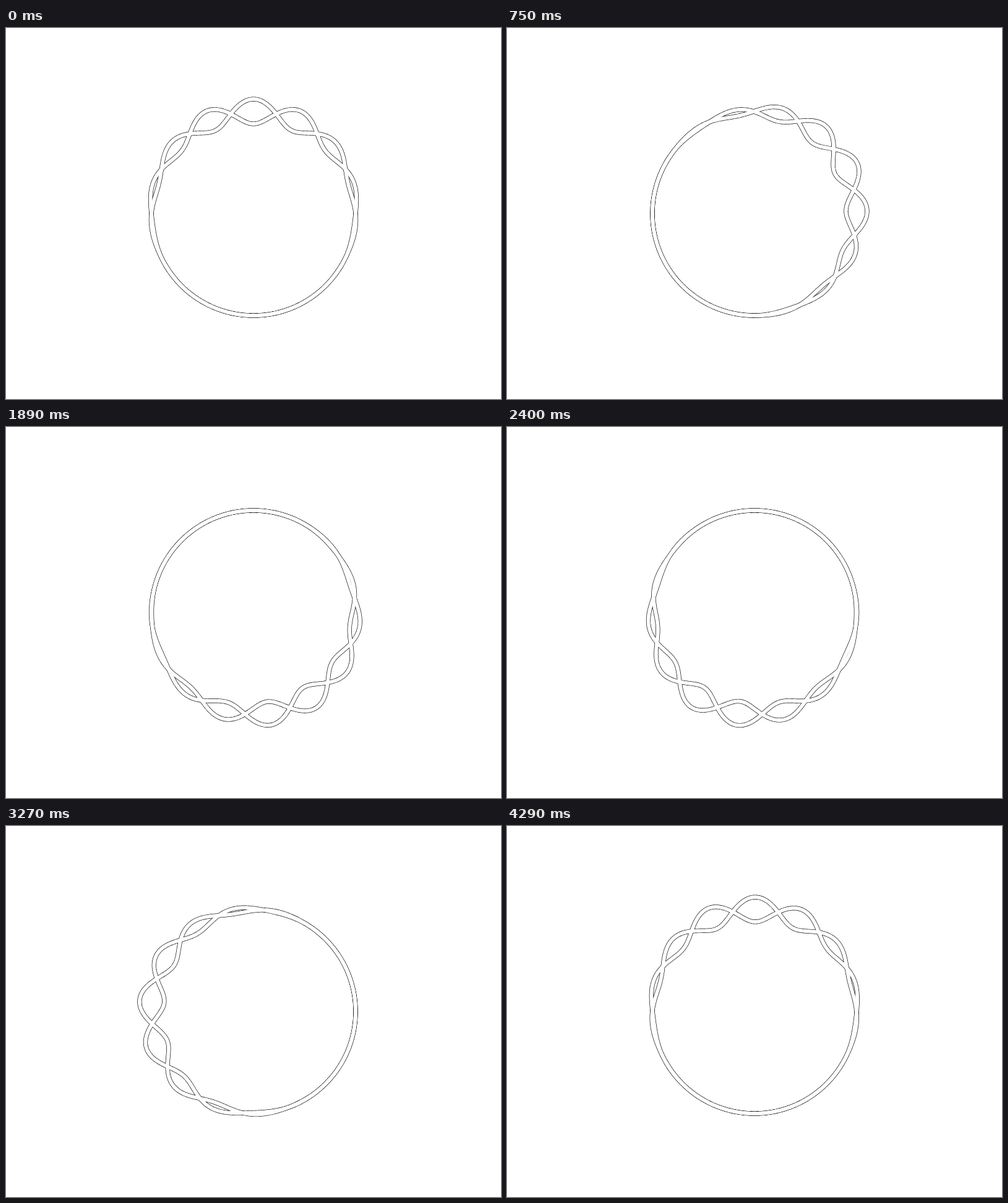
An HTML page with a canvas that plays this animation: 800 by 600 pixels, repeating every 4320 ms.

```html
<!DOCTYPE html>
<html lang="en">
<head>
<meta charset="utf-8">
<title>Braided ring</title>
<style>
  html, body { margin: 0; width: 100%; height: 100%; overflow: hidden; background: #fff; }
  canvas { display: block; }
</style>
</head>
<body>
<canvas id="stage" width="800" height="600"></canvas>
<script>
const ctx = document.getElementById("stage").getContext("2d");

const LOOP = 4320;
const STEP = 30;
const TAU = Math.PI * 2;
const CX = 400, CY = 300;
const RADIUS = 165;
const AMP = 20;
const WAVES = 7;
const POINTS = 900;

// Angles run clockwise from the top. The swell goes round once per loop
// while the wave drifts back by three half periods, swapping the strands.
function offset(angle, p) {
  const swell = Math.cos((angle - TAU * p) / 2) ** 6;
  return AMP * swell * Math.cos(WAVES * angle + 3 * Math.PI * p);
}

function strand(side, p) {
  const path = new Path2D();
  for (let i = 0; i < POINTS; i++) {
    const a = TAU * i / POINTS;
    const r = RADIUS + side * offset(a, p);
    path.lineTo(CX + r * Math.sin(a), CY - r * Math.cos(a));
  }
  path.closePath();
  return path;
}

function strokeAll(paths, width, color) {
  ctx.lineWidth = width;
  ctx.strokeStyle = color;
  for (const path of paths) ctx.stroke(path);
}

function draw(ms) {
  const p = Math.floor((ms % LOOP) / STEP) * STEP / LOOP;
  const strands = [strand(1, p), strand(-1, p)];
  ctx.fillStyle = "#fff";
  ctx.fillRect(0, 0, 800, 600);
  strokeAll(strands, 7.2, "#000");
  strokeAll(strands, 5.9, "#fff");
}

ctx.lineJoin = "round";
const start = performance.now();

function tick() {
  draw(performance.now() - start);
  requestAnimationFrame(tick);
}
tick();
</script>
</body>
</html>
```
